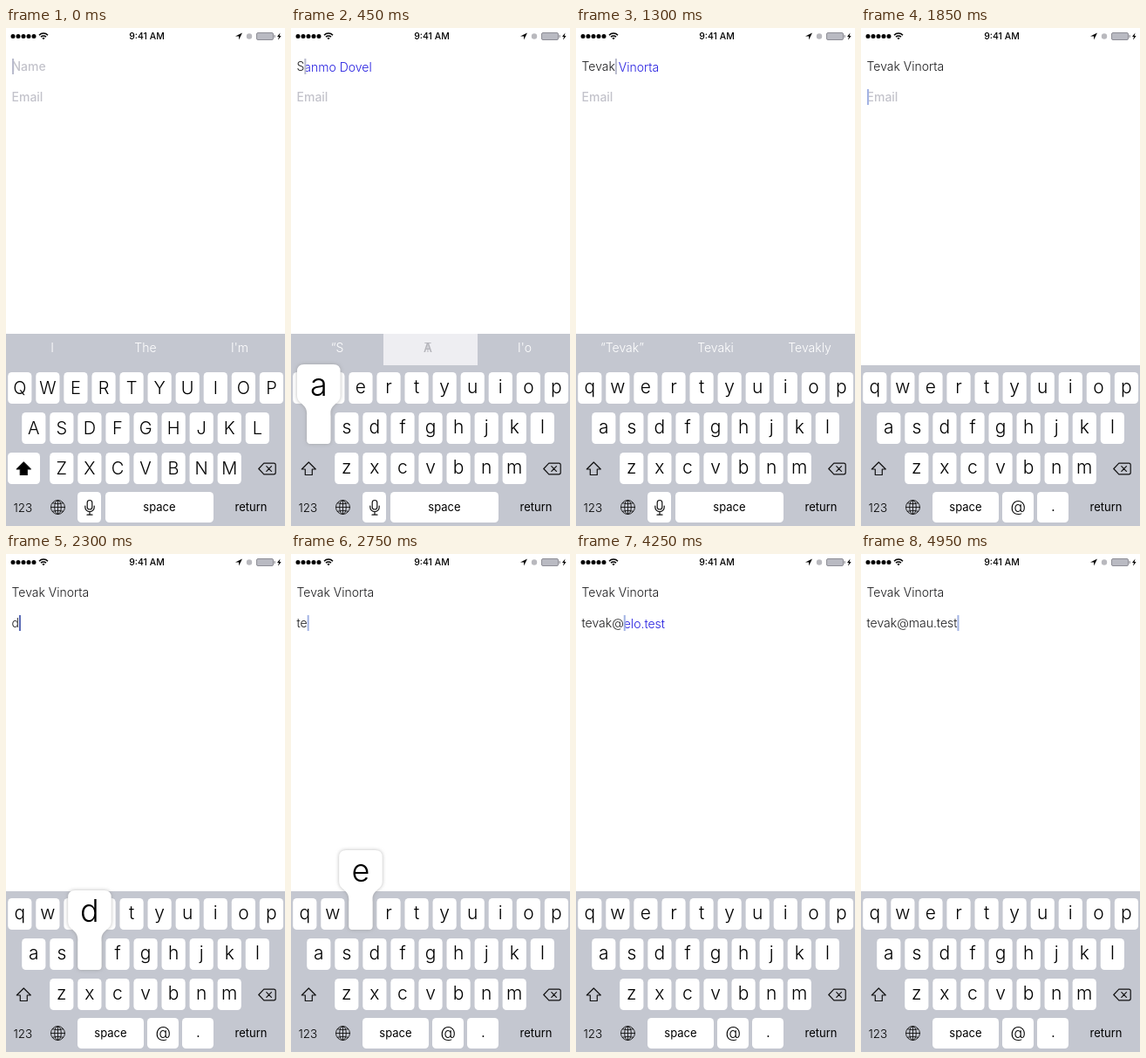
An HTML page that plays this animation: 320x570 px, repeating every 5450 ms.

```html
<!DOCTYPE html>
<html lang="en">
<head>
<meta charset="utf-8">
<title>Inline autocomplete</title>
<style>
  html, body { margin: 0; width: 100%; height: 100%; overflow: hidden; background: #fff; }
  svg { display: block; width: 320px; height: 570px; font-family: Inter, Roboto, sans-serif; }
  text { white-space: pre; }
  .mid { text-anchor: middle; }
  .key { fill: #fff; }
  .cap { font-size: 21px; font-weight: 300; }
  .upper .cap { font-size: 20px; font-weight: 350; }
  .small { font-size: 13px; }
  .bar { font-size: 14px; font-weight: 300; fill: #fff; }
  .field { font-size: 14px; fill: #1c1c1e; font-weight: 350; }
  .hint { fill: #261fe0; }
  .blank { fill: #c3c3cb; font-weight: 500; }
  .line { fill: none; stroke: #111; stroke-width: 1.2; stroke-linejoin: round; stroke-linecap: round; }
  .pop { fill: #fff; filter: drop-shadow(0 0 2px #8889); }
  .popcap { font-size: 36px; font-weight: 300; }
</style>
</head>
<body>
<svg id="stage" viewBox="0 0 320 570">
  <rect width="320" height="570" fill="#fff"/>

  <g id="status">
    <path d="M8 9.5h24.1" stroke="#000" stroke-width="5" stroke-linecap="round" stroke-dasharray="0 6"/>
    <g fill="none" stroke="#000" stroke-width="1.5">
      <path d="M38 8.2a7 7 0 0 1 10 0M40 10.3a4.2 4.2 0 0 1 6 0"/>
    </g>
    <path d="M41.5 11.7a2 2 0 0 1 3 0L43 13.3z"/>
    <text class="mid" x="161.5" y="13.2" font-size="10.5" font-weight="550">9:41 AM</text>
    <path d="M271 5.5l-8 3.9h4.1v4.1z"/>
    <circle cx="279" cy="9.5" r="3.2" fill="#b9b9be"/>
    <rect x="287.5" y="5.5" width="19" height="8" rx="1.5" fill="#b9bac2" stroke="#8e8e96"/>
    <path d="M307.5 8v3h1.2V8z" fill="#8e8e96"/>
    <path d="M314.5 5.5l-3.5 4.6h2l-1 3.6 3.6-4.8h-2z"/>
  </g>

  <g id="fields" class="field"></g>

  <rect id="board" width="320" height="220" fill="#c4c7d0"/>
  <g id="bar">
    <rect id="pick" x="106" y="350" width="108" height="36" fill="#eeeef2"/>
  </g>

  <g id="keys"></g>
  <rect id="shiftKey" class="key" x="2" y="486" width="37" height="36" rx="4.5"/>
  <path id="shift" class="line" d="M20.3 497l8 8h-4v6.5h-8v-6.5h-4z"/>
  <rect id="del" class="key" x="281" y="486" width="37" height="36" rx="4.5"/>
  <path class="line" d="M289.8 504.5l6-6.3h11.4a2 2 0 0 1 2 2v8.6a2 2 0 0 1-2 2h-11.4zM298.8 501.7l5.6 5.6m0-5.6l-5.6 5.6"/>

  <text x="8.5" y="554" font-size="13.5" font-weight="350">123</text>
  <g class="line" style="stroke-width:.9">
    <circle cx="59.5" cy="548.5" r="8"/>
    <ellipse cx="59.5" cy="548.5" rx="3.8" ry="8"/>
    <path d="M59.5 540.5v16M51.5 548.5h16M53.3 543.8q6.2 2 12.4 0M53.3 553.2q6.2-2 12.4 0"/>
  </g>
  <g id="nameRow">
    <rect class="key" x="82" y="531" width="27" height="35" rx="4.5"/>
    <g class="line">
      <rect x="93.2" y="540.5" width="5.6" height="10.5" rx="2.8"/>
      <path d="M90.8 547v1.5a5.2 5.2 0 0 0 10.4 0V547M96 553.8v3.4m-3 0h6"/>
    </g>
    <rect class="key" x="114" y="531" width="124" height="35" rx="4.5"/>
    <text class="mid small" x="176" y="553">space</text>
  </g>
  <g id="mailRow">
    <rect class="key" x="82" y="531" width="76" height="35" rx="4.5"/>
    <text class="mid small" x="120" y="553">space</text>
    <rect class="key" x="162" y="531" width="36" height="35" rx="4.5"/>
    <text class="mid" x="180.3" y="553.5" font-size="18" font-weight="300">@</text>
    <rect class="key" x="202" y="531" width="36" height="35" rx="4.5"/>
    <text class="mid" x="220.3" y="552.5" font-size="15">.</text>
  </g>
  <rect id="ret" class="key" x="242" y="531" width="76" height="35" rx="4.5"/>
  <text class="mid small" x="281" y="553">return</text>

  <g id="popup">
    <path class="pop"/>
    <text class="mid popcap"></text>
  </g>
</svg>
<script>
const LOOP = 5450;
const NAME = "Tevak Vinorta", USER = "tevak@";

// [time, field, typed, suggested rest]
const steps = [
  [0, 0, "", ""],
  [300, 0, "S", "anmo Dovel"],
  [500, 0, "Sa", "nmo Dovel"],
  [700, 0, "S", "anmo Dovel"],
  [800, 0, "", ""],
  ...[900, 1000, 1100, 1200, 1250].map((t, i) => [t, 0, NAME.slice(0, i + 1), NAME.slice(i + 1)]),
  [1800, 1, "", ""],
  [2300, 1, "d", ""],
  [2500, 1, "", ""],
  ...[2650, 2750, 2850, 2950, 3050].map((t, i) => [t, 1, USER.slice(0, i + 1), ""]),
  [3250, 1, USER, "elo.test"],
  [3500, 1, USER + "g", "mori.test"],
  [3700, 1, USER + "gm", "ori.test"],
  [4000, 1, USER + "g", "mori.test"],
  [4150, 1, USER, "elo.test"],
  [4400, 1, USER + "m", "au.test"],
  [4550, 1, USER + "ma", "u.test"],
  [4800, 1, USER + "mau.test", ""]
];

// [from, to, key]
const presses = [
  [200, 300, "s"], [400, 550, "a"], [650, 700, "del"], [750, 800, "del"],
  [850, 900, "t"], [950, 1000, "e"], [1050, 1100, "v"], [1150, 1200, "a"], [1200, 1300, "k"],
  [1700, 1800, "ret"], [2250, 2400, "d"], [2450, 2550, "del"],
  [2600, 2700, "t"], [2700, 2800, "e"], [2800, 2900, "v"], [2900, 3000, "a"], [3000, 3100, "k"],
  [3200, 3350, "@"], [3450, 3550, "g"], [3650, 3750, "m"],
  [3950, 4050, "del"], [4100, 4200, "del"],
  [4350, 4450, "m"], [4500, 4600, "a"], [4750, 4850, "ret"]
];

const $ = id => document.getElementById(id);
function add(parent, tag, attrs, content = "") {
  const el = document.createElementNS("http://www.w3.org/2000/svg", tag);
  for (const k in attrs) el.setAttribute(k, attrs[k]);
  el.textContent = content;
  return parent.appendChild(el);
}
const show = (el, on) => { el.style.display = on ? "" : "none"; };

const keys = { "@": { x: 162, y: 531, w: 36 } };
[["qwertyuiop", 2.2, 394], ["asdfghjkl", 18.2, 440], ["zxcvbnm", 50.2, 486]].forEach(([row, x0, y]) => {
  [...row].forEach((ch, i) => {
    const x = x0 + i * 32.07, w = 27.2;
    add($("keys"), "rect", { class: "key", x, y, width: w, height: 36, rx: 4.5 });
    const cap = add($("keys"), "text", { class: "cap mid", x: x + w / 2 });
    keys[ch] = { x, y, w, cap };
  });
});

const fields = ["Name", "Email"].map((label, i) => {
  const y = 49 + 35 * i;
  const blank = add($("fields"), "text", { class: "blank", x: 6.5, y }, label);
  const text = add($("fields"), "text", { x: 6.5, y });
  const typed = add(text, "tspan", {});
  const hint = add(text, "tspan", { class: "hint", dy: 0.6 });
  const caret = add($("fields"), "rect", { y: y - 14, width: 2, height: 18, fill: "#b9bbcd" });
  return { blank, typed, hint, caret };
});
const words = [53, 160, 268].map(x => add($("bar"), "text", { class: "bar mid", x, y: 371 }));
const ghost = add($("bar"), "text", { class: "bar mid", x: 157, y: 371, style: "fill:#b4b4ba;font-weight:500" }, "A");
const [balloon, bigCap] = $("popup").children;

function setField(f, typed, rest, active) {
  f.typed.textContent = typed;
  f.hint.textContent = rest;
  show(f.blank, !typed);
  show(f.caret, active);
  f.caret.setAttribute("x", 7 + (typed ? f.typed.getComputedTextLength() - 0.5 : 0));
}

function guesses(typed) {
  if (!typed) return ["I", "The", "I'm"];
  if (typed === "S") return ["“S", "T", "I'o"];
  return [`“${typed}”`, typed + "i", typed + "ly"];
}

function setPopup(key, label) {
  const { x, y, w } = key, l = x - 11.2, r = x + w + 11.2, top = y - 55;
  balloon.setAttribute("d",
    `M${l + 8} ${top}H${r - 8}q8 0 8 8V${y - 19}c0 9-11.2 9-11.2 20V${y + 32}q0 4-4 4` +
    `H${x + 4}q-4 0-4-4V${y + 1}c0-11-11.2-11-11.2-20V${top + 8}q0-8 8-8z`);
  bigCap.setAttribute("x", x + w / 2);
  bigCap.setAttribute("y", y - 19);
  bigCap.textContent = label;
}

function render(t) {
  const [, active, typed, rest] = steps.filter(s => s[0] <= t).pop();
  const press = (presses.find(p => p[0] <= t && t < p[1]) || [])[2];
  const mail = active === 1, upper = !mail && !typed;

  setField(fields[0], mail ? NAME : typed, mail ? "" : rest, !mail);
  setField(fields[1], mail ? typed : "", mail ? rest : "", mail);
  fields[1].caret.setAttribute("fill", typed === "d" ? "#5666b4" : "#a3b3e4");

  $("board").setAttribute("y", mail ? 386 : 350);
  show($("bar"), !mail);
  show($("nameRow"), !mail);
  show($("mailRow"), mail);
  guesses(typed).forEach((w, i) => { words[i].textContent = w; });
  const picked = t >= 400 && t < 500;
  show($("pick"), picked);
  show(ghost, picked);
  words[1].setAttribute("x", picked ? 157 : 160);
  words[1].style.fill = picked ? "#b4b4ba" : "";

  $("keys").setAttribute("class", upper ? "upper" : "");
  for (const ch in keys) {
    const { cap, y } = keys[ch];
    if (!cap) continue;
    cap.textContent = upper ? ch.toUpperCase() : ch;
    cap.setAttribute("y", y + (upper ? 25 : 24));
  }
  show($("shiftKey"), upper);
  $("shift").style.fill = upper ? "#000" : "none";
  show($("del"), press === "del");
  show($("ret"), press === "ret");

  const key = keys[press];
  show($("popup"), key);
  if (key) setPopup(key, upper ? press.toUpperCase() : press);
}

const start = performance.now();
function tick() {
  const t = (performance.now() - start) % LOOP;
  render(Math.floor(t / 50) * 50);
  requestAnimationFrame(tick);
}
tick();
</script>
</body>
</html>
```
